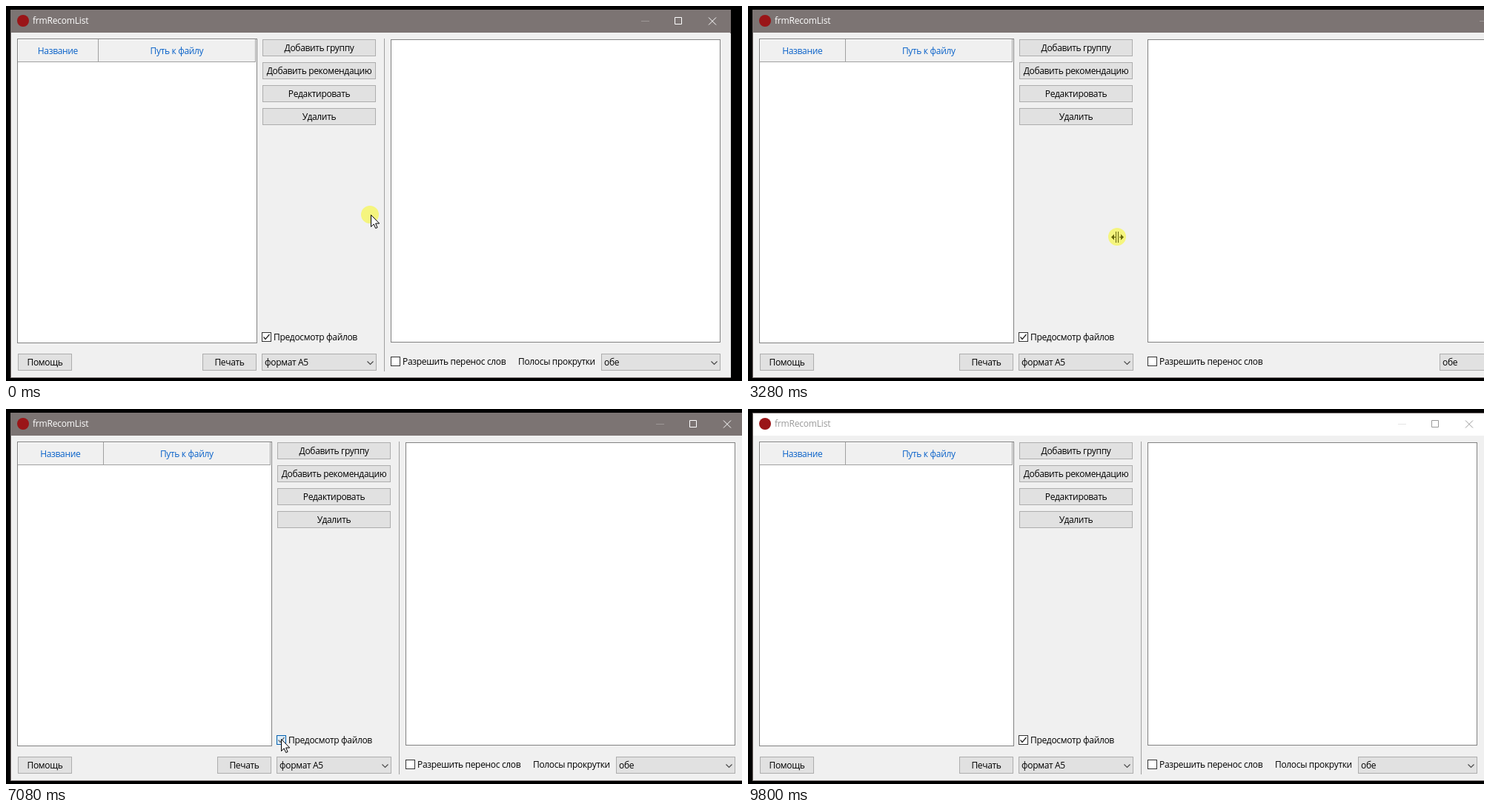
Animation of 993x507 px, one loop 9880 ms. Source, as an HTML page:

```html
<!DOCTYPE html>
<html lang="ru">
<head>
<meta charset="utf-8">
<title>frmRecomList</title>
<style>
/* --split: pane divider, --tools: buttons that repaint late, --win: right window edge, --cx/--cy: pointer */
@property --split { syntax: '<integer>'; inherits: true; initial-value: 0; }
@property --tools { syntax: '<integer>'; inherits: true; initial-value: 0; }
@property --win { syntax: '<integer>'; inherits: true; initial-value: 0; }
@property --cx { syntax: '<integer>'; inherits: true; initial-value: 491; }
@property --cy { syntax: '<integer>'; inherits: true; initial-value: 282; }

html, body { margin: 0; width: 100%; height: 100%; overflow: hidden; background: #000; }
body { --loop: 9.88s; position: relative; font: 12px/16px "Open Sans", "Noto Sans", sans-serif; letter-spacing: -.33px; color: #000;
  animation: split var(--loop) linear infinite, tools var(--loop) linear infinite,
    win var(--loop) linear infinite, point var(--loop) linear infinite; }
div, span, svg { position: absolute; box-sizing: border-box; white-space: nowrap; }

#win { inset: 0; clip-path: inset(5px calc((15 - var(--win)) * 1px) 4px 6px); }
#frame { left: 6px; top: 5px; height: 498px; width: calc((972 + var(--win)) * 1px);
  background: #f0f0f0; border: 1px solid #7c7473; }
#bar { left: 7px; top: 6px; height: 30px; width: calc((970 + var(--win)) * 1px);
  background: #7c7473; color: #fff; animation: focus var(--loop) step-end infinite; }
#logo { left: 8px; top: 6px; width: 16px; height: 16px; border-radius: 50%; background: #9a1518; }
#caption { left: 29px; top: 6px; letter-spacing: -.2px; }
#controls { right: 0; top: 0; }
.tools { left: calc(var(--tools) * 1px); top: 0; }
.split { left: calc(var(--split) * 1px); top: 0; }
.win { left: calc(max(var(--win), var(--split)) * 1px); top: 0; }

.btn, .combo { height: 23px; line-height: 22px; background: #e1e1e1; border: 1px solid #adadad; }
.btn { text-align: center; }
.combo { padding-left: 3px; }
.combo svg { right: 3px; top: 8px; }
.tool { left: 346px; width: 153px; }
.box { width: 13px; height: 13px; background: #fff; border: 1px solid #333; }
.box svg { left: -1px; top: -1px; }

#list { left: 15px; top: 44px; height: 412px; width: calc((324 + var(--split)) * 1px);
  border: 1px solid #828282; overflow: hidden; }
#sheet { left: 0; top: 0; height: 410px; width: calc((323 + var(--tools)) * 1px);
  background: #fff; border-right: 1px solid #828282; }
#head { left: 0; top: 0; right: 1px; height: 31px; background: #f0f0f0; border: solid #a0a0a0; border-width: 0 1px 1px 0;
  box-shadow: inset 1px 1px #fff; color: #0a62c9; line-height: 32px; text-align: center; }
#head div { top: 0; height: 30px; }
#name { left: 0; width: 34%; border-right: 1px solid #a0a0a0; }
#path { left: 34%; right: 0; }
.stale { opacity: clamp(0, var(--split) - var(--tools), 1); }
#scroll { left: 1px; right: 1px; bottom: 1px; height: 18px; background: #f0f0f0; }
#thumb { left: 16px; top: 1px; width: 17px; height: 16px; background: #cdcdcd; }
#gap { left: 339px; top: 40px; width: 6px; height: 456px; background: #f0f0f0; }
#cover { left: 264px; top: 470px; height: 24px; background: #f0f0f0;
  width: max(0px, calc((1 + var(--split) - var(--tools)) * 1px)); }

#right { left: calc((501 + var(--split)) * 1px); top: 37px; width: 700px; height: 465px; background: #f0f0f0; }
#memo { left: calc((519 + var(--split)) * 1px); top: 45px; height: 410px;
  width: max(0px, calc((445 + var(--win) - var(--split)) * 1px)); background: #fff; border: 1px solid #828282; }
.settled { animation: settled var(--loop) step-end infinite; }
#line { left: 510px; top: 44px; width: 1px; height: 450px; background: #a0a0a0; }
.trail { background: #000; }

#preview { left: 345px; top: 441px; animation: press var(--loop) linear infinite; }
#tick { animation: tick var(--loop) linear infinite; }
#wrap { left: 519px; top: 474px; animation: hover var(--loop) step-end infinite; }

#pointer { left: calc(var(--cx) * 1px); top: calc(var(--cy) * 1px); animation: present var(--loop) step-end infinite; }
#glow { left: -12px; top: -12px; width: 24px; height: 24px; border-radius: 50%; background: rgba(250,250,15,.51);
  animation: glow var(--loop) step-end infinite; }
#pointer svg { overflow: visible; }
#arrow { left: 1px; animation: arrow var(--loop) step-end infinite; }
#resize { animation: resize var(--loop) step-end infinite; }

@keyframes split {
  0%, 11.7% { --split: 0; } 19.4%, 20.1% { --split: 2; } 20.2%, 20.6% { --split: 19; }
  21.8%, 22.2% { --split: 88; } 23.8%, 25.1% { --split: 130; }
  28.3%, 28.6% { --split: 81; } 33.1%, 100% { --split: 20; }
}
@keyframes tools {
  0%, 11.7% { --tools: 0; } 19.4%, 20.9% { --tools: 2; }
  21.8%, 22.2% { --tools: 88; } 23.8%, 25.1% { --tools: 130; }
  28.3%, 28.6% { --tools: 87; } 33.1%, 100% { --tools: 20; }
}
@keyframes win {
  0%, 11.7% { --win: 0; } 19.4%, 20.1% { --win: 2; } 20.2%, 20.6% { --win: 19; }
  21.8%, 22.2% { --win: 88; }
  23.8% { --win: 130; animation-timing-function: step-end; }
  42.1% { --win: 20; animation-timing-function: step-end; }
  63.15% { --win: -449; animation-timing-function: step-end; }
  70.8% { --win: 20; animation-timing-function: step-end; }
  83.8% { --win: -449; animation-timing-function: step-end; }
  87.85%, 100% { --win: 20; }
}
@keyframes point {
  0%, .6% { --cx: 491; --cy: 282; }
  2.8%, 4.8% { --cx: 516; --cy: 291; }
  5.6%, 11.7% { --cx: 511; --cy: 291; }
  19.4% { --cx: 530; --cy: 310; }
  20.2%, 20.6% { --cx: 551; --cy: 313; }
  21.8% { --cx: 605; --cy: 313; }
  23.8%, 25.1% { --cx: 640; --cy: 313; }
  28.3%, 28.6% { --cx: 589; --cy: 312; }
  33.1%, 41.7% { --cx: 498; --cy: 312; }
  50.6%, 51.8% { --cx: 541; --cy: 482; }
  52.2%, 53% { --cx: 541; --cy: 485; }
  60.7%, 78.9% { --cx: 370; --cy: 446; }
  78.94%, 88.6% { --cx: 368; --cy: 446; }
  93.4%, 100% { --cx: 994; --cy: 300; }
}
@keyframes focus { 0% { background: #7c7473; color: #fff; } 99.15%, 100% { background: #fff; color: #999; } }
@keyframes settled { 0% { opacity: 1; } 19.8% { opacity: 0; } 42.1%, 100% { opacity: 1; } }
@keyframes hover { 0% { border-color: #333; } 50.2% { border-color: #0078d7; } 53%, 100% { border-color: #333; } }
@keyframes press {
  0%, 60.3% { background: #fff; border-color: #333; }
  60.7%, 62.2% { background: #fff; border-color: #0078d7; }
  62.34%, 65.3% { background: #cce4f7; border-color: #005499; }
  68%, 70% { background: #fff; border-color: #0078d7; }
  70.04%, 71.3% { background: #cce4f7; border-color: #005499; }
  72.4%, 83.8% { background: #fff; border-color: #0078d7; }
  83.81%, 84.5% { background: #cce4f7; border-color: #005499; }
  85.4%, 87% { background: #fff; border-color: #0078d7; }
  87.04%, 87.8% { background: #cce4f7; border-color: #005499; }
  88.6%, 100% { background: #fff; border-color: #333; }
}
@keyframes tick {
  0%, 65.3% { opacity: 1; } 68%, 70.4% { opacity: 0; } 72.4%, 83.8% { opacity: 1; }
  85%, 87.4% { opacity: 0; } 88.3%, 100% { opacity: 1; }
}
@keyframes glow {
  0% { opacity: 1; } 42.1% { opacity: 0; } 62.34% { opacity: 1; } 63.9% { opacity: 0; }
  70.03% { opacity: 1; } 71.6% { opacity: 0; } 83.39% { opacity: 1; } 85.4% { opacity: 0; }
  87.04% { opacity: 1; } 88.2%, 100% { opacity: 0; }
}
@keyframes arrow { 0% { opacity: 1; } 8.9% { opacity: 0; } 42.1%, 100% { opacity: 1; } }
@keyframes resize { 0% { opacity: 0; } 8.9% { opacity: 1; } 42.1%, 100% { opacity: 0; } }
@keyframes present { 0% { opacity: 1; } 93.5%, 100% { opacity: 0; } }
</style>
</head>
<body>
<svg width="0" height="0">
  <defs>
    <path id="chevron" d="M.5 1.5 4.5 5.5 8.5 1.5" fill="none" stroke="#444" stroke-width="1.1"/>
  </defs>
</svg>
<div id="win">
  <div id="frame"></div>
  <div id="bar">
    <div id="logo"></div>
    <span id="caption">frmRecomList</span>
    <svg id="controls" width="130" height="30" fill="none" stroke="currentColor">
      <path d="M10 14.5h11" opacity=".25"/>
      <path d="M55.5 9.5h9v9h-9zM101 9.5l10 10m0-10-10 10"/>
    </svg>
  </div>

  <div class="btn" style="left:16px;top:470px;width:73px">Помощь</div>
  <div class="tools">
    <div class="btn tool" style="top:45px">Добавить группу</div>
    <div class="btn tool" style="top:76px">Добавить рекомендацию</div>
    <div class="btn tool" style="top:107px">Редактировать</div>
    <div class="btn tool" style="top:138px">Удалить</div>
    <div class="box" id="preview">
      <svg id="tick" width="13" height="13"><path d="M2.5 6.5 5 9.5 10.5 3" fill="none" stroke="#222" stroke-width="1.3"/></svg>
    </div>
    <span style="left:361px;top:440px">Предосмотр файлов</span>
    <div class="btn" style="left:265px;top:470px;width:73px">Печать</div>
    <div class="combo" style="left:345px;top:470px;width:155px">формат А5<svg width="9" height="7"><use href="#chevron"/></svg></div>
    <div id="cover"></div>
  </div>
  <div class="split"><div id="gap"></div></div>

  <div id="list">
    <div id="sheet">
      <div id="head"><div id="name">Название</div><div id="path">Путь к файлу</div></div>
    </div>
    <div id="scroll" class="stale">
      <div id="thumb"></div>
      <svg width="16" height="18" fill="none" stroke="#444" stroke-width="1.6"><path d="M10 5.5 6 9l4 3.5"/></svg>
      <svg style="right:0" width="16" height="18" fill="none" stroke="#444" stroke-width="1.6"><path d="M6 5.5 10 9l-4 3.5"/></svg>
    </div>
  </div>

  <div id="right"></div>
  <div id="memo"></div>
  <div class="split">
    <div id="line" class="settled"></div>
    <div class="box" id="wrap"></div>
    <span style="left:535px;top:473px">Разрешить перенос слов</span>
  </div>
  <div class="win">
    <span class="settled" style="left:691px;top:473px">Полосы прокрутки</span>
    <div class="combo" style="left:803px;top:470px;width:161px">обе<svg width="9" height="7"><use href="#chevron"/></svg></div>
    <div class="stale trail" style="left:959px;top:46px;width:3px;height:407px"></div>
    <div class="stale trail" style="left:959px;top:470px;width:5px;height:23px"></div>
  </div>
</div>

<div id="pointer">
  <div id="glow"></div>
  <svg id="resize" width="1" height="1" fill="#66660c">
    <path d="M-2-7h1V8h-1zM1-7h1V8h-1zM-8 .5l4-4V0h2v1h-2v3.5zM9 .5l-4-4V0H3v1h2v3.5z"/>
  </svg>
  <svg id="arrow" width="1" height="1">
    <path d="M.5.5v16l3.7-3.6 2.5 5.6 2.4-1-2.5-5.5h5.1z" fill="#fff" stroke="#000"/>
  </svg>
</div>
</body>
</html>
```
